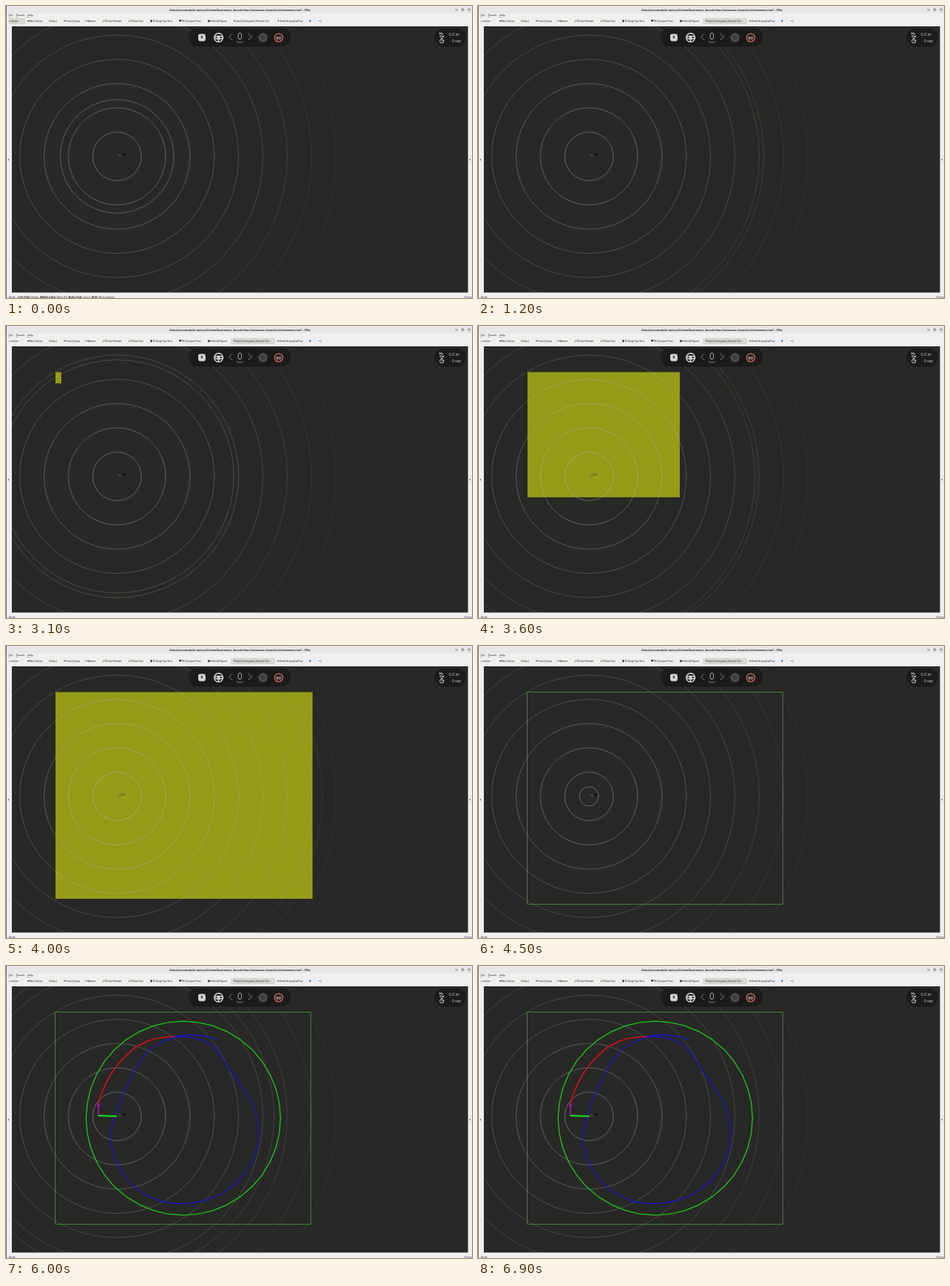
Recreate the animation shown at these times as an HTML page. Size 640 by 402 pixels, loop 7000 ms.

```html
<!DOCTYPE html>
<html lang="en">
<head>
<meta charset="utf-8">
<title>Area selection</title>
<style>
html, body { margin: 0; width: 100%; height: 100%; overflow: hidden; background: #f0efed; }
svg { display: block; width: 100%; height: 100%; }
text { font-family: Roboto, "Open Sans", sans-serif; fill: #222; white-space: pre; }
.title { font: 700 3.72px "Open Sans", sans-serif; }
.menu { font: 4px "Open Sans", sans-serif; }
.tool { font-size: 2.95px; }
.status { font: 3.45px "Open Sans", sans-serif; }
.info { font: 5.5px "Open Sans", sans-serif; fill: #ddd; }
b, .bold { font-weight: 700; }
.line { fill: none; stroke-linecap: round; stroke-linejoin: round; }
</style>
</head>
<body>
<svg viewBox="0 0 640 402" preserveAspectRatio="none">
  <defs><clipPath id="clip"><rect x="8" y="28" width="626.5" height="366.5"/></clipPath></defs>

  <rect width="640" height="402" fill="#f0efed"/>
  <rect width="640" height="10" fill="#e8e7e5"/>
  <rect width="1" height="402" fill="#777"/>
  <text class="title" x="321" y="6.6" text-anchor="middle" id="title">/home/sorano/pilot-auto.xx1/install/autoware_launch/share/autoware_launch/rviz/autoware.rviz* - RViz</text>
  <g fill="#d6d4d1">
    <circle cx="618.7" cy="5" r="2.5"/><circle cx="627.3" cy="5" r="2.5"/><circle cx="635.9" cy="5" r="2.5"/>
  </g>
  <path class="line" stroke="#444" stroke-width=".5" d="M617.6 5.8h2.2M626.3 4h2v2h-2zM635 4.1l1.8 1.8m0-1.8l-1.8 1.8"/>
  <g class="menu">
    <text class="menu" x="3.5" y="14.3"><tspan text-decoration="underline">F</tspan>ile</text>
    <text class="menu" x="13.5" y="14.3"><tspan text-decoration="underline">P</tspan>anels</text>
    <text class="menu" x="28.7" y="14.3"><tspan text-decoration="underline">H</tspan>elp</text>
  </g>
  <rect id="active" y="17" height="7.4" rx="1" fill="#dad8d5" stroke="#bdbab6" stroke-width=".4"/>
  <g id="tools"></g>
  <path class="line" stroke="#3478d0" stroke-width=".9" d="M416.2 20.5h2.8M417.6 19.1v2.8M429.8 20.5h2.6"/>
  <path fill="#555" d="M432.4 22.3h1.6l-.8 1zM4 210v3l-1.7-1.5zM636.5 210v3l1.7-1.5z"/>

  <g clip-path="url(#clip)">
    <rect x="8" y="28" width="627" height="367" fill="#282826"/>
    <rect id="drag" x="68" y="63.5" fill="#949c19"/>
    <g id="rings" class="line" stroke="#c9c9c6" stroke-width=".8"></g>
    <g id="car">
      <path fill="#1b1b1b" d="M152.5 205l9-2.4 2 1.8-.8 1.8-9.7 1.6z"/>
      <path class="line" stroke="#5c5c5a" stroke-width=".7" d="M153 205l4.500-1.200M153.500 207.200l5-.8M158.500 203.800l.5 2.300M155.500 204.500l.4 2.200"/>
      <rect x="161" y="203.200" width="2.300" height="2.500" fill="#090909"/>
    </g>
    <rect id="area" class="line" x="68" y="63.5" width="350.7" height="292" stroke="#46903f" stroke-width=".9"/>
    <g id="paths" class="line"></g>
  </g>

  <rect x="250.500" y="30.500" width="141" height="25.500" rx="12.700" fill="#1b1b1a"/>
  <rect x="264" y="38.500" width="10" height="10" rx="2.400" fill="#d2d2d0"/>
  <text x="269" y="45.300" text-anchor="middle" class="bold" font-size="5">P</text>
  <g class="line" stroke="#d6d6d4" stroke-width="1.500">
    <circle cx="292" cy="43.500" r="5.900"/>
    <path d="M286.500 42.500q5.500-2.200 11 0M292 44v5M287 44.500l4 1M297 44.500l-4 1"/>
  </g>
  <circle cx="292" cy="43.700" r="2" fill="#d6d6d4"/>
  <path class="line" stroke="#5c5c5a" stroke-width="1.100" d="M310.500 38.500l-4.500 4 4.500 4M333 38.500l4.500 4-4.500 4"/>
  <text x="321.300" y="46.300" text-anchor="middle" font-size="12.500" font-weight="300" style="fill:#e4e4e2">0</text>
  <text x="321.300" y="51.300" text-anchor="middle" font-size="3.400" style="fill:#bbb">km/h</text>
  <circle cx="353" cy="43.500" r="6.400" fill="#484846"/>
  <text x="353" y="46" text-anchor="middle" font-size="7" style="fill:#252524">0</text>
  <circle cx="374.500" cy="43.500" r="5.700" fill="#262423" stroke="#d0696a" stroke-width="1.300"/>
  <text x="374.500" y="45.700" text-anchor="middle" class="bold" font-size="6" style="fill:#e9b4b2">60</text>

  <rect x="588.500" y="31" width="43" height="25" rx="12" fill="#1b1b1a"/>
  <g class="line" stroke="#dcdcda" stroke-width=".9">
    <path d="M596 37.500h2.500q1.500 0 1.500 1.300t-1.500 1.300h-1.200q-1.300 0-1.300 1.200t1.300 1.200h3.200"/>
    <circle cx="598.500" cy="48.300" r="2.700"/><path d="M597.500 44.600h2M598.500 48.300v-1.300"/>
  </g>
  <circle cx="596" cy="37.500" r="1" fill="#dcdcda"/><circle cx="600.700" cy="42" r="1" fill="#dcdcda"/>
  <text class="info" x="608.300" y="41.300">0.0 m</text>
  <text class="info" x="612.500" y="50.300">0 sec</text>

  <text class="status" x="4" y="402">Reset</text>
  <text class="status" id="hint" x="16.500" y="402"><tspan class="bold">Left-Click:</tspan> Rotate. <tspan class="bold">Middle-Click:</tspan> Move X/Y. <tspan class="bold">Right-Click:</tspan> Zoom. <tspan class="bold">Shift:</tspan> More options.</text>
  <text class="status" x="639.300" y="402" text-anchor="end">31 fps</text>
</svg>
<script>
const $ = id => document.getElementById(id);
const LOOP = 7000, STEP = 100;
const CX = 152.5, CY = 207, GAP = 33.4;
const PICK_AT = 600, DRAG_AT = 2900, DROP_AT = 4300, PLAN_AT = 5200;

function add(parent, tag, attrs, text) {
  const el = document.createElementNS(parent.namespaceURI, tag);
  for (const k in attrs) el.setAttribute(k, attrs[k]);
  if (text) el.textContent = text;
  parent.append(el);
  return el;
}
function set(el, attrs) { for (const k in attrs) el.setAttribute(k, attrs[k]); }
const show = (el, on) => el.setAttribute('visibility', on ? 'visible' : 'hidden');

// Toolbar
const icons = {
  hand: ['M-3 1.200l1-1.800 1.300 1.800z', '#777'],
  move: ['M-3 0l1.400-1.400L-.2 0l-1.400 1.400z', '#555'],
  box: ['M-3-1.100h2.200v2.200h-2.200z', '#8d9b6c'],
  focus: ['M-3-.3h2.600v.6h-2.600zM-2-1.300h.6v2.600h-.6z', '#555'],
  ruler: ['M-3.200-.5h2.600v1h-2.600z', '#667'],
  arrow: ['M-3.500 1.200l2.600-2.600.4 1.200-2.400 1.600z', '#27b04a'],
  pin: ['M-3.200-.4a1.200 1.200 0 1 1 2.400 0L-1.300.4v1.200h-1.400V.4z', '#111'],
  flag: ['M-3.500-1.500h2.800v1.700h-2.200v1.500h-.6z', '#111'],
  bin: ['M-3.300-1.500h2.600v.5h-2.600zM-3-.7h2v2.200h-2z', '#111'],
  gem: ['M-3.400 0l1.400-1.500L-.6 0-2 1.500z', '#6b7a92']
};
[
  [7, 'hand', 'Interact'], [32, 'move', 'Move Camera'], [62, 'box', 'Select'],
  [82.5, 'focus', 'Focus Camera'], [112, 'ruler', 'Measure'],
  [135.500, 'arrow', '2D Pose Estimate'], [171, 'arrow', '2D Goal Pose'],
  [201.500, 'pin', '2D Rough Goal Pose'], [241.500, 'flag', '2D Checkpoint Pose'],
  [280.500, 'bin', 'Delete All Objects'],
  [315.500, 'gem', 'Data Collecting Area Selection Tool'],
  [376, 'gem', 'DataCollectingGoalPose']
].forEach(([x, icon, label]) => {
  const [d, fill] = icons[icon];
  add($('tools'), 'path', { d, fill, transform: `translate(${x} 20.600)` });
  add($('tools'), 'text', { x, y: 21.500, class: 'tool' }, label);
});

// Range rings fade with distance
const fade = r => Math.max(0.03, 0.52 * (1 - r / 350));
const ring = r => add($('rings'), 'circle', { cx: CX, cy: CY, r, 'stroke-opacity': fade(r) });
for (let i = 1; i <= 10; i++) ring(i * GAP);
const pulse = ring(0);

// Smooth curve through points
function curve(pts, closed) {
  const n = pts.length;
  const at = i => closed ? pts[(i + n) % n] : pts[Math.max(0, Math.min(n - 1, i))];
  let d = 'M' + pts[0];
  for (let i = 0; i < (closed ? n : n - 1); i++) {
    const [a, b, c, e] = [at(i - 1), at(i), at(i + 1), at(i + 2)];
    const p = [0, 1].map(k => b[k] + (c[k] - a[k]) / 6);
    const q = [0, 1].map(k => c[k] - (e[k] - b[k]) / 6);
    d += `C${p} ${q} ${c}`;
  }
  return d;
}
const draw = (d, stroke, width) => add($('paths'), 'path', { d, stroke, 'stroke-width': width });

const circle = Array.from({ length: 40 }, (_, i) => {
  const a = i * Math.PI / 20;
  return [243.5 + 133.5 * Math.cos(a), 209.5 + 133.5 * Math.sin(a)];
});
draw('M' + circle.join('L') + 'Z', '#1fb51d', 1.5);
draw(curve([
  [150, 206], [162, 174], [178, 141], [190, 123], [208, 108], [235, 98], [255, 98.500],
  [275, 105], [290, 117], [312, 150], [335, 183], [345, 210], [347, 235], [341, 262],
  [325, 289], [300, 311], [272, 323], [240, 327], [210, 322.500], [180, 307],
  [157, 280], [145.500, 250], [144.500, 228]
], true), '#1b13c4', 1.4);
draw(curve([[231, 97], [250, 95], [270, 96], [289, 101.500]]), '#1b13c4', 1.4);
draw(curve([
  [127, 190], [131, 176], [139, 158], [151, 139], [166, 122], [183, 109], [205, 100], [231, 97]
]), '#d8101c', 1.6);
draw('M127 206V190M125.700 193L127 189.500l1.300 3.500', '#b414b8', 1.4);
draw('M127.500 206L151.500 206.800', '#12e21c', 2.2);

// Drag corner: time, width, height
const drag = [[2900, 0, 0], [3100, 8, 15.5], [4000, 353, 284.5], [4200, 351, 292], [4300, 351, 292]];
function dragSize(t) {
  const i = Math.max(1, drag.findIndex(k => t <= k[0]));
  const [t0, w0, h0] = drag[i - 1], [t1, w1, h1] = drag[i];
  const u = Math.max(0, (t - t0) / (t1 - t0)), s = u * u * (3 - 2 * u);
  return { width: w0 + (w1 - w0) * s, height: h0 + (h1 - h0) * s };
}

function render(time) {
  const t = Math.floor(time % LOOP / STEP) * STEP;
  const r = (t + 578) % 2490 * 0.135;
  set(pulse, { r, 'stroke-opacity': fade(r) });

  const picked = t >= PICK_AT;
  set($('active'), picked ? { x: 309.5, width: 59.5 } : { x: 4, width: 22 });
  show($('hint'), !picked);

  const dragging = t >= DRAG_AT && t < DROP_AT;
  show($('drag'), dragging);
  if (dragging) set($('drag'), dragSize(t));
  set($('car'), { opacity: dragging && t > 3400 ? 0.2 : 1 });
  show($('area'), t >= DROP_AT);
  show($('paths'), t >= PLAN_AT);
}

const start = performance.now();
function tick() {
  render(performance.now() - start);
  requestAnimationFrame(tick);
}
render(0);
requestAnimationFrame(tick);
</script>
</body>
</html>
```
